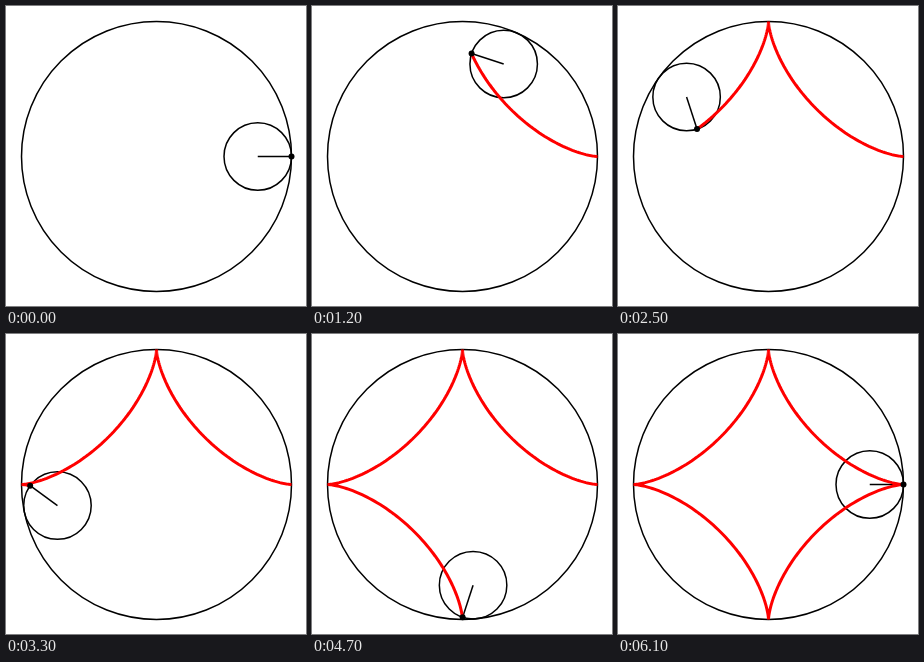
These frames come from a looping animation (300x300 px, 6.8 s). An HTML page with a canvas:

```html
<!DOCTYPE html>
<html lang="en">
<head>
<meta charset="utf-8">
<title>Astroid traced by a rolling circle</title>
<style>
  html, body { margin: 0; width: 100%; height: 100%; overflow: hidden; background: #fff; }
  canvas { display: block; }
</style>
</head>
<body>
<canvas id="stage" width="300" height="300"></canvas>
<script>
const ctx = document.getElementById('stage').getContext('2d');
const LOOP = 6800, STEP = 100, STEPS = 60;
const CENTER = 150.5, R = 135, r = R / 4;

const rad = degrees => degrees * Math.PI / 180;

function polar(x, y, radius, degrees) {
  return [x + radius * Math.cos(rad(degrees)), y - radius * Math.sin(rad(degrees))];
}

const hub = degrees => polar(CENTER, CENTER, R - r, degrees);
const pen = degrees => polar(...hub(degrees), r, -3 * degrees);

function stroke(color, width) {
  ctx.strokeStyle = color;
  ctx.lineWidth = width;
  ctx.stroke();
}

function circle(x, y, radius) {
  ctx.beginPath();
  ctx.arc(x, y, radius, 0, 2 * Math.PI);
}

function draw(time) {
  // The picture holds for two steps at the start and rests at the end.
  const step = Math.floor(time % LOOP / STEP) - 1;
  const angle = 360 / STEPS * Math.min(Math.max(step, 0), STEPS);
  const [hx, hy] = hub(angle);
  const [px, py] = pen(angle);

  ctx.fillStyle = '#fff';
  ctx.fillRect(0, 0, 300, 300);

  circle(CENTER, CENTER, R);
  stroke('#000', 1.5);
  circle(hx, hy, r);
  stroke('#000', 1.5);

  ctx.beginPath();
  ctx.moveTo(hx, hy);
  ctx.lineTo(px, py);
  stroke('#000', 1.5);

  ctx.lineJoin = 'bevel';
  ctx.beginPath();
  for (let a = 0; a <= angle; a++) ctx.lineTo(...pen(a));
  stroke('#f00', 3);

  circle(px, py, 3);
  ctx.fillStyle = '#000';
  ctx.fill();
}

const start = performance.now();
function tick() {
  draw(performance.now() - start);
  requestAnimationFrame(tick);
}
tick();
</script>
</body>
</html>
```
